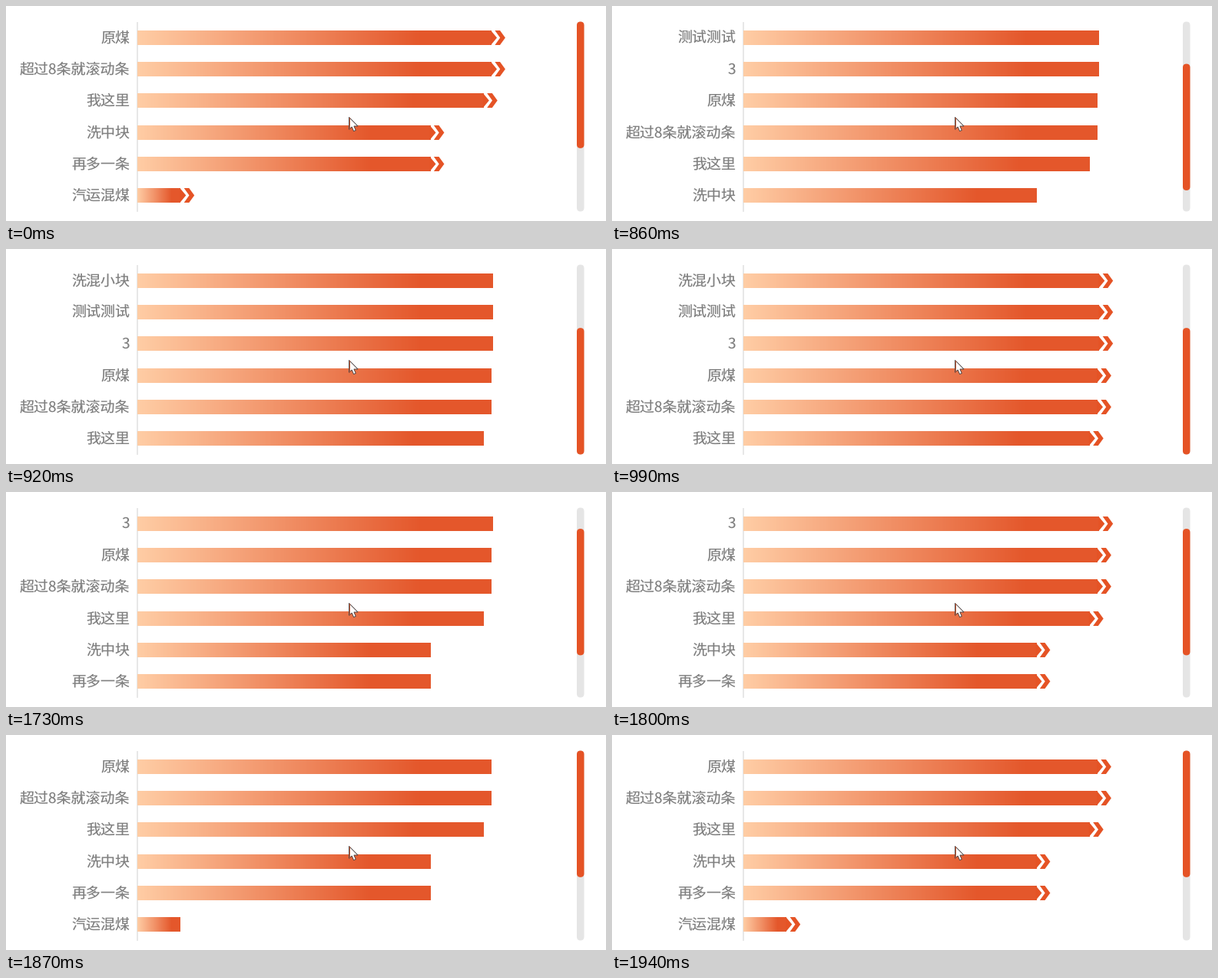
Recreate the animation shown at these times as a matplotlib script. Size 781 by 281 pixels, loop 2670 ms.

```python
import matplotlib.pyplot as plt
import numpy as np
from matplotlib.animation import FuncAnimation
from matplotlib.colors import LinearSegmentedColormap
from matplotlib.patches import FancyBboxPatch, Polygon

W, H, DPI = 781, 281, 100
PT = 72 / DPI  # points per pixel
STEP_MS, LOOP_MS = 10, 2670

LEFT, TOP, BOTTOM = 171, 20.5, 268.5
ROWS, BAR_H, PITCH = 6, 19, 41.25
ORANGE = "#e55325"

ITEMS = [
    ("洗混小块", 463), ("测试测试", 463), ("3", 463),
    ("原煤", 460.7), ("超过8条就滚动条", 460.7), ("我这里", 450.5),
    ("洗中块", 381.2), ("再多一条", 381.2), ("汽运混煤", 56),
]

# start time, first visible item, arrow tips shown
STATES = [
    (0, 3, True), (860, 1, False), (920, 0, False), (990, 0, True),
    (1730, 2, False), (1800, 2, True), (1870, 3, False), (1940, 3, True),
]
MAX_FIRST = len(ITEMS) - ROWS
THUMB_H = (BOTTOM - TOP) * ROWS / len(ITEMS)
THUMB_STEP = (BOTTOM - TOP) / len(ITEMS)

plt.rcParams["font.family"] = ["Noto Sans CJK JP", "DejaVu Sans"]
plt.rcParams["text.hinting"] = "none"

fig = plt.figure(figsize=(W / DPI, H / DPI), dpi=DPI, facecolor="white")
ax = fig.add_axes([0, 0, 1, 1])
ax.axis("off")

fade = LinearSegmentedColormap.from_list(
    "fade", [(0, "#ffcda5"), (0.8, "#e4572b"), (1, "#e4572b")], N=512)
ramp = np.linspace(0, 1, 512)[None, :]


def pill(y, height, color):
    """Rounded vertical bar of the scroll control."""
    r = 4.7
    box = FancyBboxPatch((743, y), 9.5, height, fc=color, ec="none",
                         boxstyle=f"round,pad=0,rounding_size={r}")
    return ax.add_patch(box)


def shape(**style):
    return ax.add_patch(Polygon([(0, 0), (1, 0), (0, 1)], **style))


def bar_top(row):
    return round(32 + PITCH * row)


ax.plot([170.7, 170.7], [TOP, BOTTOM], color="#e0e0e0", lw=1.5 * PT,
        solid_capstyle="butt")
pill(TOP, BOTTOM - TOP, "#e5e5e5")
thumb = pill(TOP, THUMB_H, ORANGE)

bars, labels, heads, chevrons = [], [], [], []
for row in range(ROWS):
    bars.append(ax.imshow(ramp, cmap=fade, aspect="auto", vmin=0, vmax=1,
                          interpolation="nearest", zorder=2))
    labels.append(ax.text(161.5, 47.2 + PITCH * row, "", ha="right",
                          va="baseline", size=19 * PT, color="#808080"))
    heads.append(shape(fc=ORANGE, ec="none", zorder=3))
    chevrons.append(shape(fc=ORANGE, ec="none", zorder=3))

pointer = [(446.5, 145.3), (446.5, 161.3), (450.2, 158), (452.6, 163.6),
           (455.3, 162.4), (452.9, 157), (458, 157)]
ax.add_patch(Polygon(pointer, fc="white", ec="#4a4040", lw=0.9 * PT, zorder=5))
ax.plot([446.5, 446.5], [145.5, 161], color="#c65a35", lw=PT, zorder=6)

ax.set_xlim(0, W)
ax.set_ylim(H, 0)


def draw(i):
    t = i * STEP_MS
    _, first, tips = [s for s in STATES if s[0] <= t][-1]
    thumb.set_y(TOP + (MAX_FIRST - (MAX_FIRST - first)) * 0
                + (MAX_FIRST - first) * THUMB_STEP)
    for row, (name, width) in enumerate(ITEMS[first:first + ROWS]):
        y0 = bar_top(row)
        y1, mid, end = y0 + BAR_H, y0 + BAR_H / 2, LEFT + width
        bars[row].set_extent((LEFT, end, y1, y0))
        labels[row].set_text(name)
        heads[row].set_xy([(end - 0.6, y0), (end + 7.3, mid), (end - 0.6, y1)])
        chevrons[row].set_xy([
            (end + 4.7, y0), (end + 11.3, y0), (end + 18.2, mid),
            (end + 11.3, y1), (end + 4.7, y1), (end + 11.5, mid)])
        heads[row].set_visible(tips)
        chevrons[row].set_visible(tips)
    return [thumb, *bars, *labels, *heads, *chevrons]


anim = FuncAnimation(fig, draw, frames=LOOP_MS // STEP_MS, interval=STEP_MS,
                     repeat=True, repeat_delay=0, blit=False)
plt.show()
```
